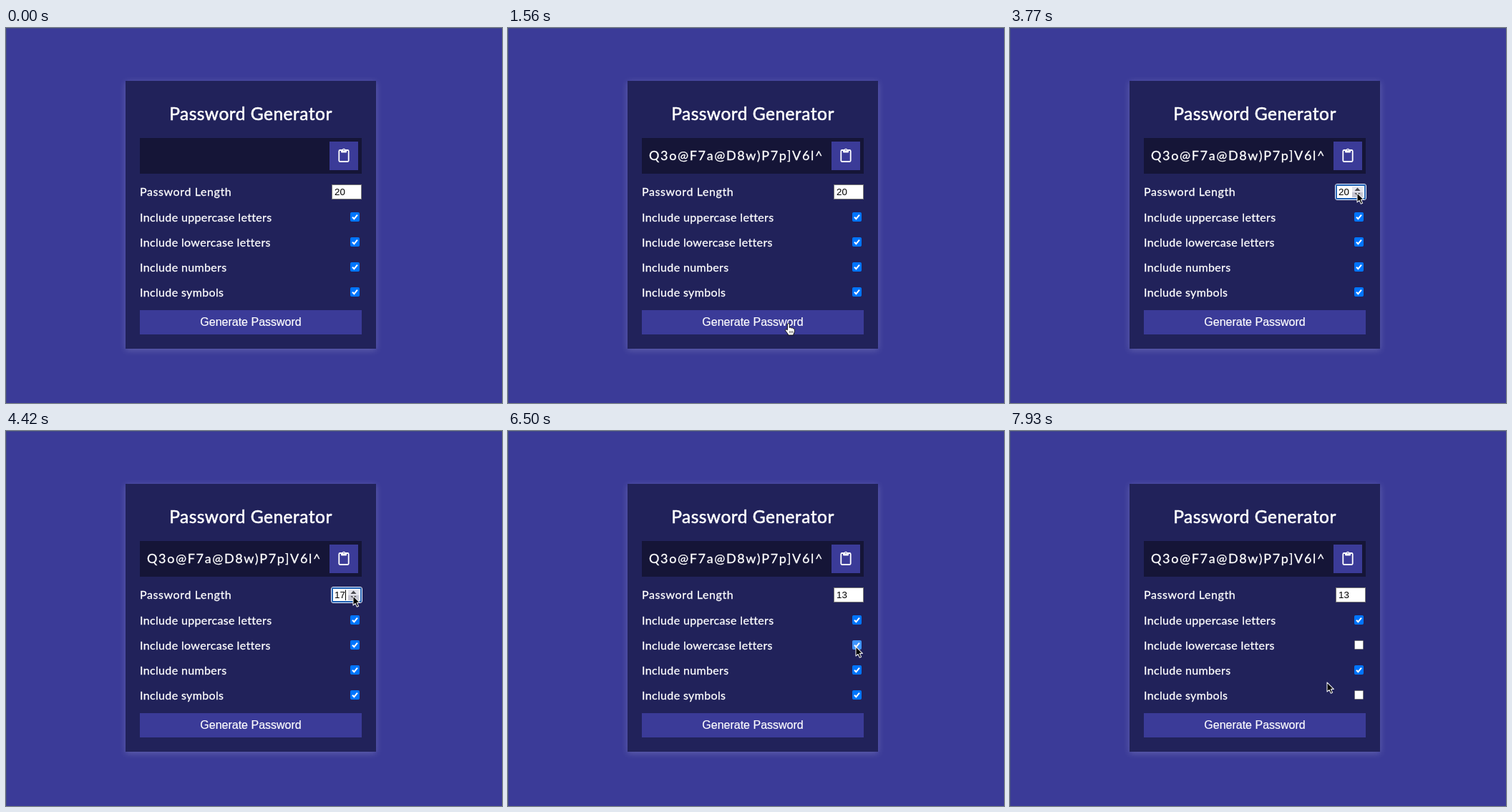
An HTML page for the animation above (8 s loop, 693x525 px).

```html
<!DOCTYPE html>
<html lang="en">
<head>
<meta charset="utf-8">
<title>Password Generator</title>
<style>
  html, body { margin: 0; width: 100%; height: 100%; overflow: hidden; background: #3b3b98; }
  svg { display: block; width: 693px; height: 525px; }
  text { font-family: Lato, sans-serif; fill: #fff; stroke: #fff; stroke-width: .3px; white-space: pre; }
  .label { font-size: 16px; letter-spacing: .35px; }
  .title { font-size: 24.5px; letter-spacing: .5px; stroke-width: .55px; text-anchor: middle; }
  .password { font-size: 18px; letter-spacing: 1.65px; }
  .button { font: 16px "Liberation Sans", Arial, sans-serif; stroke-width: .2px; text-anchor: middle; }
  .number { font: 13.33px "Liberation Sans", Arial, sans-serif; fill: #000; stroke: none; }
  .card { filter: drop-shadow(0 2px 5px rgba(255, 255, 255, .2)); }
</style>
</head>
<body>
<svg viewBox="0 0 693 525">
  <rect width="693" height="525" fill="#3b3b98"/>
  <path d="M0 .5H693M.5 0V525" stroke="#414984"/>
  <rect class="card" x="167" y="74" width="350" height="375" fill="#21225a"/>
  <text class="title" x="342" y="128.5">Password Generator</text>

  <rect x="187" y="154" width="310" height="50" fill="#151537"/>
  <text class="password" id="password" x="197" y="185">Q3o@F7a@D8w)P7p]V6l^</text>
  <rect x="452" y="159" width="40" height="40" fill="#3b3b98"/>
  <rect x="465.3" y="171" width="13.4" height="16" rx="1.5" fill="none" stroke="#fff" stroke-width="1.8"/>
  <path d="M468.5 174V171.2H470A2 2 0 0 1 474 171.2H475.5V174Z" fill="#fff" stroke="#fff"/>
  <circle cx="472" cy="170.8" r=".8" fill="#3b3b98"/>

  <text class="label" x="187" y="235" style="letter-spacing:.6px">Password Length</text>
  <rect x="455.5" y="219.5" width="41" height="20" fill="#fff" stroke="#767676"/>
  <g id="ring" fill="none">
    <rect x="454.5" y="218.5" width="43" height="22" rx="2.5" stroke="#e8efff"/>
    <rect x="456" y="220" width="40" height="19" rx="1" stroke="#1c5fb4" stroke-width="1.8"/>
  </g>
  <g id="spinner">
    <rect x="478" y="222" width="15" height="15" fill="#e4e4ec"/>
    <rect id="pressed" x="478" y="230" width="15" height="7" fill="#c6c6d2"/>
    <path d="M481.5 228L485.5 223.5L489.5 228ZM481.5 231L485.5 235.5L489.5 231Z" fill="#4a4a50"/>
  </g>
  <text class="number" id="number" x="459" y="234">20</text>
  <path id="caret" d="M474.5 222.5V237" stroke="#000"/>

  <g id="options"></g>

  <rect x="187" y="395" width="310" height="34" fill="#3b3b98"/>
  <text class="button" x="342" y="417">Generate Password</text>

  <g id="cursor">
    <path id="arrow" d="M0 0V13L3 10.3L5.3 15.3L7.6 14.3L5.4 9.4H9.4Z" fill="#000" stroke="#e6e6ea" stroke-width="1.1" stroke-linejoin="round"/>
    <path id="hand" d="M-1.6 8.5V1A1.4 1.4 0 0 1 1.2 1V5.5Q3 4.4 3.8 6Q5.5 5 6.2 6.7Q8.3 6 8.3 8.5V11.5L6.5 16H-.2Q-1.2 13.5-4.4 9.8C-5 8-3 7.2-1.6 8.9Z" fill="#fff" stroke="#111" stroke-linejoin="round"/>
    <path id="knuckles" d="M1.7 10V13.3M3.7 10V13.3M5.7 10V13.3" stroke="#333" stroke-width=".8"/>
  </g>
</svg>
<script>
const LOOP = 8000, TICK = 130;
const byId = id => document.getElementById(id);
const show = (id, on) => byId(id).setAttribute("visibility", on ? "visible" : "hidden");

// time, x, y of the pointer tip
const path = [
  [390, 440, 522], [1170, 392, 414], [1690, 392, 414],
  [2470, 293, 226], [2600, 296, 224], [3510, 485, 231],
  [5200, 485, 231], [5980, 486, 302], [6630, 486, 302],
  [7280, 486, 372], [7540, 486, 372], [7930, 443, 352]
];

// label, press time, release time
const options = [
  ["uppercase letters"], ["lowercase letters", 6500, 6630],
  ["numbers"], ["symbols", 7410, 7540]
].map(([name, press = Infinity, release = Infinity], i) => ({ name, press, release, y: 258 + 35 * i }));

byId("options").innerHTML = options.map(({ name, y }) => `
  <text class="label" x="187" y="${y + 13}">Include ${name}</text>
  <g transform="translate(481 ${y})">
    <rect class="box" x=".5" y=".5" width="12" height="12" rx="1"/>
    <path class="tick" d="M3 6.8L5.4 9.2L10 3.6" fill="none" stroke="#fff" stroke-width="2"/>
  </g>`).join("");
const boxes = document.querySelectorAll(".box");
const ticks = document.querySelectorAll(".tick");

function pointerAt(t) {
  const next = path.findIndex(p => p[0] > t);
  if (next < 0) return path[path.length - 1].slice(1);
  if (next === 0) return path[0].slice(1);
  const [t0, x0, y0] = path[next - 1], [t1, x1, y1] = path[next];
  const k = (t - t0) / (t1 - t0), ease = k * k * (3 - 2 * k);
  return [x0 + (x1 - x0) * ease, y0 + (y1 - y0) * ease];
}

const inside = (x, y, l, t, r, b) => x >= l && x < r && y >= t && y < b;

function draw(t) {
  const [x, y] = pointerAt(t);
  const visible = t >= 390;
  const focused = t >= 3640 && t < 6500;
  const hand = inside(x, y, 187, 395, 497, 429) || inside(x, y, 452, 159, 492, 199);

  byId("cursor").setAttribute("transform", `translate(${x.toFixed(1)} ${y.toFixed(1)})`);
  show("arrow", visible && !hand);
  show("hand", visible && hand);
  show("knuckles", visible && hand);

  show("password", t >= 1560);
  byId("number").textContent = 20 - Math.max(0, Math.min(7, Math.floor((t - 3900) / 180) + 1));
  show("ring", focused);
  show("spinner", focused || inside(x, y, 455, 219, 497, 240));
  show("pressed", t >= 3640 && t < 5200);
  show("caret", focused && t >= 3900 && !(t >= 5460 && t < 5980));

  options.forEach((o, i) => {
    const checked = t < o.release;
    const hover = visible && inside(x, y, 481, o.y, 494, o.y + 13);
    const blue = t >= o.press ? "#3f94ff" : hover ? "#005cc8" : "#0075ff";
    boxes[i].setAttribute("fill", checked ? blue : "#fff");
    boxes[i].setAttribute("stroke", checked ? blue : "#767676");
    ticks[i].setAttribute("visibility", checked ? "visible" : "hidden");
  });
}

const start = performance.now();
function frame() {
  const t = (performance.now() - start) % LOOP;
  draw(Math.floor(t / TICK) * TICK);
  requestAnimationFrame(frame);
}
frame();
</script>
</body>
</html>
```
